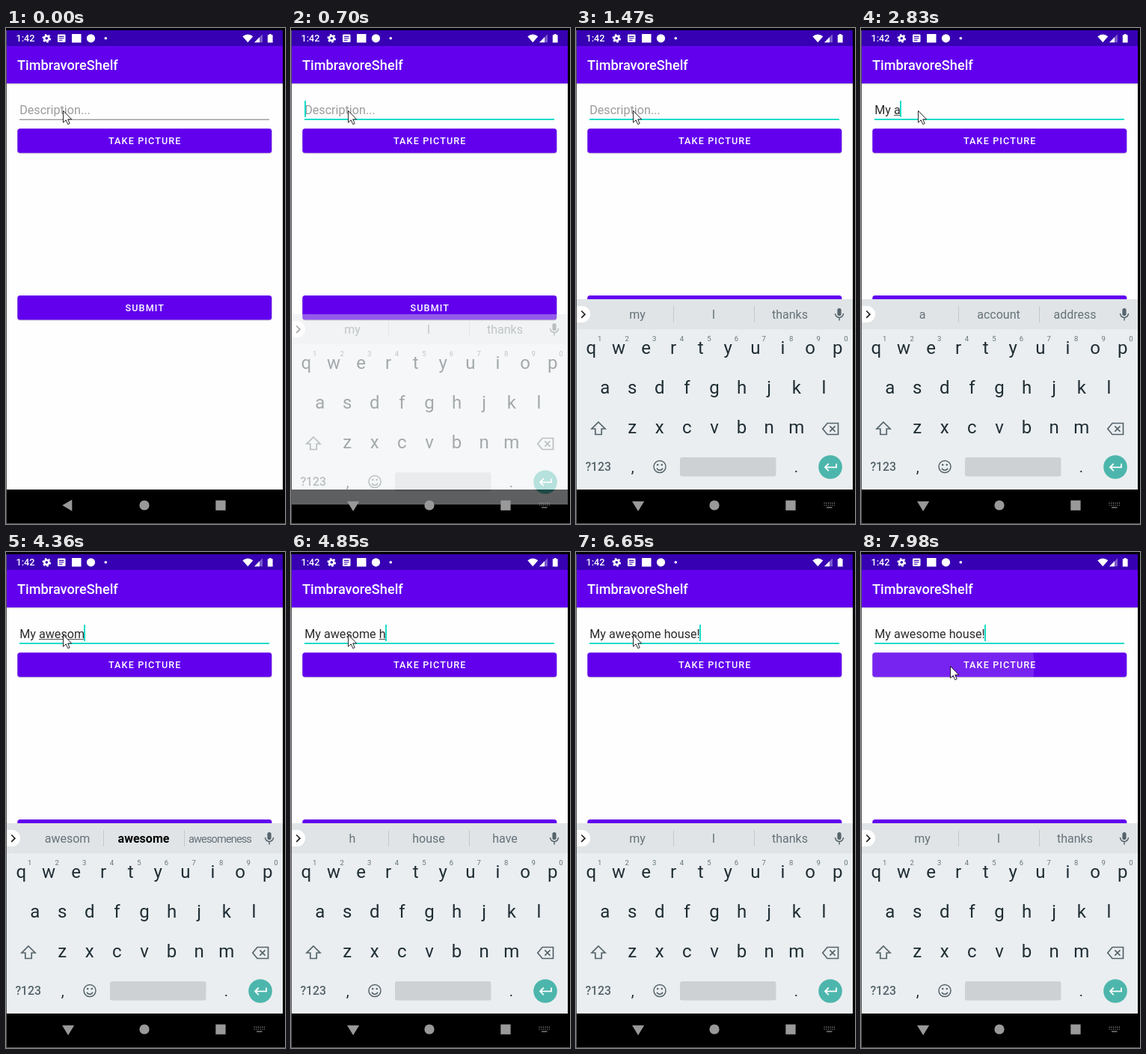
An HTML page for the animation above (8 s loop, 373 by 662 pixels).

```html
<!DOCTYPE html>
<html lang="en">
<head>
<meta charset="utf-8">
<title>Typing a description</title>
<style>
  html, body { margin: 0; width: 100%; height: 100%; overflow: hidden; background: #000; }
  svg { display: block; font-family: Roboto, sans-serif; }
  text { white-space: pre; }
  .mid { text-anchor: middle; }
  .field { font-size: 16.15px; }
  .button { font-size: 12.6px; font-weight: 500; letter-spacing: 1.13px; fill: #fff; text-anchor: middle; }
  .line { fill: none; stroke: #56646b; stroke-width: 1.7; }
  .key { font-size: 24px; fill: #1f2d34; text-anchor: middle; }
  .key.mark { font-size: 20px; }
  .hint { font-size: 9.5px; fill: #66747b; text-anchor: middle; }
  .suggestion { font-size: 16px; fill: #66727a; text-anchor: middle; }
  .suggestion.bold { font-weight: 700; fill: #000; }
  .suggestion.long { font-size: 14.6px; letter-spacing: -.9px; }
</style>
</head>
<body>
<svg id="stage" width="373" height="662" viewBox="0 0 373 662">
  <defs>
    <clipPath id="buttonClip"><rect x="15.3" y="134.2" width="340" height="32.5" rx="3.5"/></clipPath>
  </defs>
  <rect width="373" height="662"/>
  <rect y="3" width="1" height="658" fill="#555"/>
  <rect x="1" y="24" width="369" height="592" fill="#fefefe"/>

  <!-- status bar -->
  <rect x="1" y="3" width="369" height="21" fill="#3700b3"/>
  <g fill="#fff">
    <text x="13.5" y="18.4" font-size="12.6" font-weight="500">1:42</text>
    <g fill="none" stroke="#fff">
      <circle cx="54.3" cy="13.8" r="3.1" stroke-width="2.6"/>
      <circle cx="54.3" cy="13.8" r="4.9" stroke-width="1.9" pathLength="12" stroke-dasharray="1"/>
    </g>
    <rect x="69" y="8.5" width="10.5" height="10.5" rx="1.3"/>
    <path d="M71 11.4h6.5M71 13.8h6.5M71 16.2h4.5" stroke="#3700b3" stroke-width="1.1"/>
    <rect x="88" y="8" width="12.5" height="11.5"/>
    <circle cx="113.5" cy="13.8" r="5.6"/>
    <circle cx="133.3" cy="13.8" r="1.8"/>
    <path d="M316.3 11.2Q323.3 5.8 330.3 11.2L323.3 19.3Z"/>
    <path d="M343 8.3V19.2H332Z" opacity=".35"/>
    <path d="M339 12.3V19.2H332Z"/>
    <path d="M349.8 9.2h2V8h2.8v1.2h2V19.4h-6.8Z"/>
  </g>

  <!-- app bar and form -->
  <rect x="1" y="74" width="369" height="1.6" fill="#000" opacity=".12"/>
  <rect x="1" y="24" width="369" height="50" fill="#6200ee"/>
  <text x="15" y="56.2" font-size="18.2" font-weight="500" fill="#fff">TimbravoreShelf</text>
  <text id="placeholder" class="field" x="18.2" y="115" fill="#9b9b9b">Description...</text>
  <text id="entry" class="field" x="18.2" y="115" fill="#2b2b2b"></text>
  <rect id="composing" y="116" height="1" fill="#555"/>
  <rect id="fieldLine" x="18" width="334"/>
  <rect id="caret" y="97" width="2" height="22" fill="#03dac5" opacity=".9"/>
  <g fill="#000" opacity=".18">
    <rect x="15.3" y="135.3" width="340" height="32.5" rx="3.5"/>
    <rect x="15.3" y="358.1" width="340" height="32.5" rx="3.5"/>
  </g>
  <g fill="#6200ee">
    <rect x="15.3" y="134.2" width="340" height="32.5" rx="3.5"/>
    <rect x="15.3" y="357" width="340" height="32.5" rx="3.5"/>
  </g>
  <circle id="ripple" cx="119" cy="152" r="112.5" fill="#fff" opacity=".14" clip-path="url(#buttonClip)"/>
  <text class="button" x="185.8" y="155.4">TAKE PICTURE</text>
  <text class="button" x="185.8" y="378">SUBMIT</text>

  <rect x="1" y="616" width="369" height="45"/>

  <g id="keyboard">
    <rect x="1" y="362" width="369" height="254" fill="#eaeef0"/>
    <rect x="1" y="362" width="369" height="40" fill="#e0e4e6"/>
    <path d="M130.5 371v22M238.5 371v22" stroke="#c2c8cb"/>
    <path d="M1 371h7a11 11 0 0 1 0 22H1Z" fill="#fff"/>
    <path d="M7.2 377.5l4.7 4.7-4.7 4.7" class="line" style="stroke:#222"/>
    <rect x="349.4" y="374" width="5.2" height="10" rx="2.6" fill="#56646b"/>
    <path d="M346.5 381a5.5 5.5 0 0 0 11 0M352 386.5v4" class="line" style="stroke-width:1.5"/>
    <g id="suggestions"></g>
    <g id="keys"></g>
    <path d="M30 526l9 9h-4.8v7.5h-8.4v-7.5H21Z" class="line"/>
    <path d="M336 527.5h14.5v15H336l-6.2-7.5ZM339.3 531.3l7.2 7.4m0-7.4l-7.2 7.4" class="line"/>
    <text class="mid" x="29.7" y="591" font-size="15.8" font-weight="500" fill="#56646b">?123</text>
    <text class="key mark" x="75.7" y="593">,</text>
    <text class="key mark" x="294.5" y="593">.</text>
    <circle cx="112" cy="585.5" r="8" class="line" style="stroke-width:1.5"/>
    <path d="M108 587.6a4.4 4.4 0 0 0 8 0" class="line" style="stroke-width:1.5"/>
    <circle cx="109.2" cy="583" r="1.3" fill="#56646b"/>
    <circle cx="114.8" cy="583" r="1.3" fill="#56646b"/>
    <rect x="139" y="573" width="128.5" height="25.5" rx="3" fill="#cdd1d3"/>
    <circle cx="340" cy="586" r="15.8" fill="#4db6ac"/>
    <path d="M348 581.5v4.8h-15m4.8-4.8l-4.8 4.8 4.8 4.8" class="line" style="stroke:#fff;stroke-width:1.8"/>
  </g>

  <!-- navigation bar -->
  <g fill="#999">
    <path id="back" d="M88.3 629.5v15.2L75.3 637.1Z"/>
    <g id="hide">
      <path d="M75 631.8h16.2L83.1 645Z"/>
      <path d="M331.5 634.2h14.5M331.5 637h14.5" stroke="#999" stroke-width="1.2" stroke-dasharray="1.2 1.45"/>
      <path d="M335 640h7.5" stroke="#999" stroke-width="1.2"/>
    </g>
    <circle cx="185" cy="637" r="6.6"/>
    <rect x="280.3" y="630.5" width="13.3" height="13.3"/>
  </g>
  <rect y="661" width="373" height="1" fill="#555"/>

  <path id="pointer" d="M.5 .5V16.2L4.2 12.8 6.8 18.6 9.2 17.5 6.7 11.9H11.7Z" fill="#fff" stroke="#111" stroke-width=".9"/>
</svg>

<script>
const LOOP = 8000;
const el = id => document.getElementById(id);
const show = (node, visible) => node.setAttribute('visibility', visible ? 'visible' : 'hidden');

function addText(parent, className, x, y, content = '') {
  const node = document.createElementNS('http://www.w3.org/2000/svg', 'text');
  node.setAttribute('class', className);
  node.setAttribute('x', x);
  node.setAttribute('y', y);
  node.textContent = content;
  parent.append(node);
  return node;
}

[['qwertyuiop', 20.4, 435], ['asdfghjkl', 38.7, 488], ['zxcvbnm', 75.2, 541]].forEach(([letters, left, y], row) => {
  [...letters].forEach((letter, i) => {
    const x = left + i * 36.58;
    addText(el('keys'), 'key', x, y, letter);
    if (row === 0) addText(el('keys'), 'hint', x + 11.2, 418, (i + 1) % 10);
  });
});
const slots = [82, 184, 286].map(x => addText(el('suggestions'), 'suggestion', x, 388.3));

// [time, text, last word is being composed, suggestions, middle one is the correction]
const typing = [
  [0, '', 0, 'my I thanks'],
  [2440, 'M', 1, 'M My Me'],
  [2560, 'My', 1, 'M My Me'],
  [2680, 'My', 1, 'My Myself Mystery'],
  [2830, 'My a', 1, 'a account address'],
  [3720, 'My aw', 1, 'aw awesome awful'],
  [4000, 'My awe', 1, 'awe awesome awful'],
  [4120, 'My awes', 1, 'awes awesome awesomeness', 1],
  [4240, 'My aweso', 1, 'aweso awesome awesomeness', 1],
  [4360, 'My awesom', 1, 'awesom awesome awesomeness', 1],
  [4480, 'My awesome', 1, 'awesome awesomely awesomeness'],
  [4600, 'My awesome ', 0, 'friend day new'],
  [4850, 'My awesome h', 1, 'h house have'],
  [4990, 'My awesome ho', 1, 'ho house home'],
  [5110, 'My awesome hou', 1, 'hou house hour', 1],
  [5230, 'My awesome hous', 1, 'hous house home', 1],
  [5480, 'My awesome housr', 1, 'housr house Houston', 1],
  [6010, 'My awesome hous', 1, 'hous house home', 1],
  [6130, 'My awesome house', 1, 'house houses home'],
  [6530, 'My awesome house!', 0, 'house houses home'],
  [6650, 'My awesome house!', 0, 'my I thanks'],
];
const caretToggles = [440, 1470, 2000, 3350, 3720, 7210, 7730];
// [time, vertical offset, opacity]
const keyboardSteps = [[0, 0, 0], [700, 20, .4], [820, 7, .86], [940, 0, 1]];
const pointerSteps = [[0, 76, 110], [7210, 88, 122], [7330, 108, 141], [7450, 119, 152]];

const stepAt = (steps, t) => steps.findLast(step => step[0] <= t);
let currentTyping;

function setTyping(step) {
  if (step === currentTyping) return;
  currentTyping = step;
  const [, text, composing, words, corrected] = step;
  const entry = el('entry');
  entry.textContent = text;
  const end = text ? entry.getComputedTextLength() : 0;
  const wordStart = text.lastIndexOf(' ') + 1;
  const start = wordStart ? entry.getSubStringLength(0, wordStart) : 0;
  show(el('placeholder'), !text);
  el('composing').setAttribute('x', 18.2 + start);
  el('composing').setAttribute('width', composing ? end - start : 0);
  el('caret').setAttribute('x', Math.floor(18 + end));
  words.split(' ').forEach((word, i) => {
    slots[i].textContent = word;
    slots[i].classList.toggle('long', word.length > 10);
    slots[i].classList.toggle('bold', i === 1 && !!corrected);
  });
}

function render(t) {
  setTyping(stepAt(typing, t));

  const focused = t >= 440;
  const line = el('fieldLine');
  line.setAttribute('y', focused ? 121 : 121.7);
  line.setAttribute('height', focused ? 2 : 1);
  line.setAttribute('fill', focused ? '#1bdcc9' : '#757575');
  show(el('caret'), caretToggles.filter(time => time <= t).length % 2);

  const [, offset, opacity] = stepAt(keyboardSteps, t);
  el('keyboard').setAttribute('transform', `translate(0 ${offset})`);
  el('keyboard').setAttribute('opacity', opacity);
  show(el('back'), t < 700);
  show(el('hide'), t >= 700);

  const [, x, y] = stepAt(pointerSteps, t);
  el('pointer').setAttribute('transform', `translate(${x} ${y})`);
  show(el('ripple'), t >= 7980);
}

const began = performance.now();
function frame() {
  render((performance.now() - began) % LOOP);
  requestAnimationFrame(frame);
}
frame();
</script>
</body>
</html>
```
